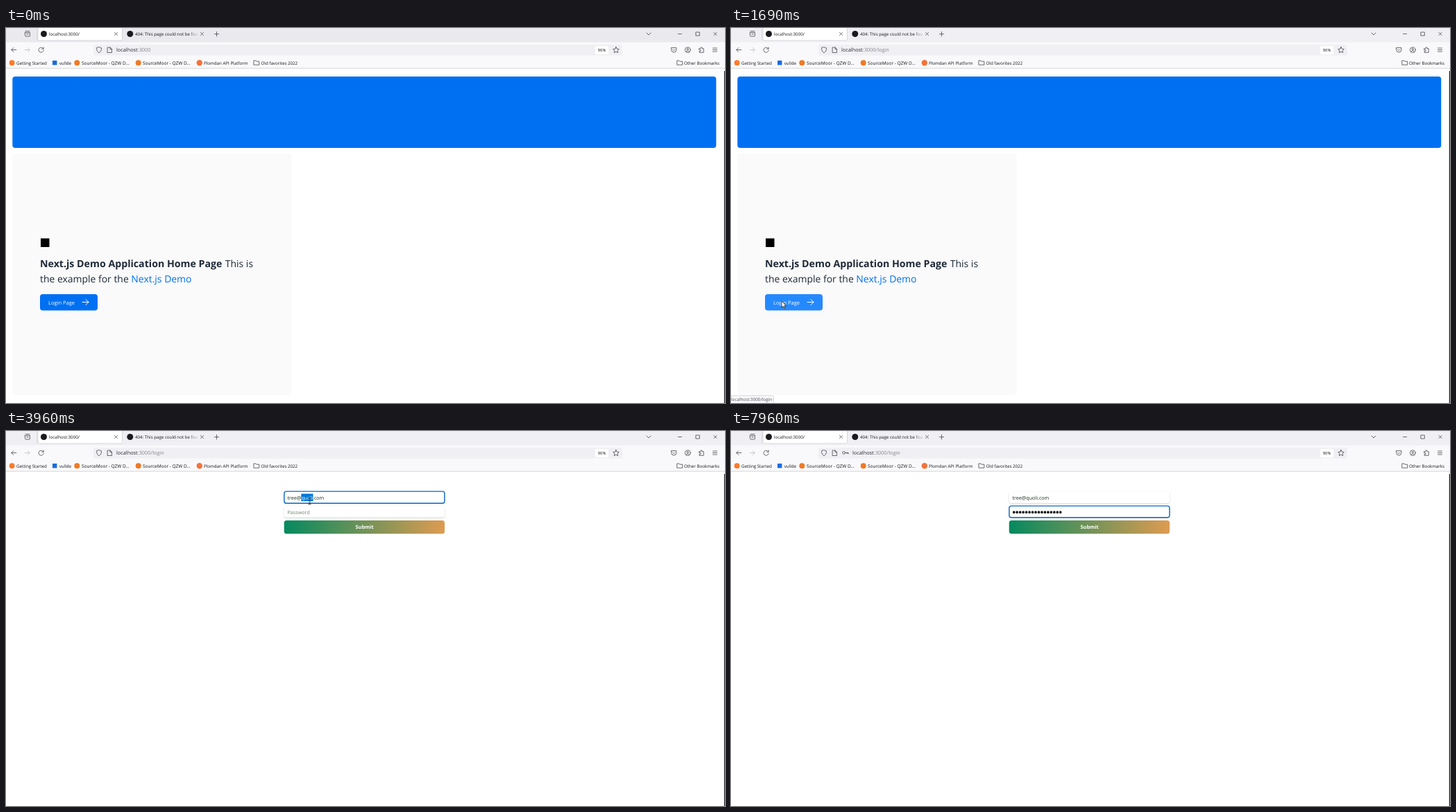
Animation of 1036x541 px, one loop 8 s. Source, as an HTML page:

```html
<!DOCTYPE html>
<html lang="en">
<head>
<meta charset="utf-8">
<title>Login demo</title>
<style>
  html, body { margin: 0; width: 100%; height: 100%; overflow: hidden; background: #fff; }
  svg { display: block; width: 100vw; height: 100vh; }
  text { font: 6.2px "Open Sans", "Noto Sans", sans-serif; text-rendering: geometricPrecision; white-space: pre; fill: #15141a; }
  .icon { fill: none; stroke: #45444d; stroke-width: .8; stroke-linecap: round; stroke-linejoin: round; }
  .url text { font-size: 7.34px; fill: #86858c; }
  .url .host { fill: #2b2a33; }
  .lead { font-size: 13.95px; fill: #1f2937; }
  .lead .strong { font-size: 14.2px; font-weight: 700; }
  .lead .link { fill: #0070f3; }
  .field { fill: #fff; filter: drop-shadow(0 1.6px 1.2px rgba(0, 0, 0, .17)); }
  .ring { fill: #fff; stroke: #0b66c3; stroke-width: 1.4; }
  .value { font-size: 7.16px; fill: #16301c; }
  .hint { font-size: 7.2px; fill: #73826f; }
  .caret { stroke: #111; stroke-width: .7; }

  /* One 8 s clock for every part; hard switches unless stated otherwise. */
  .strip, .home, .login, .status, .path, .shift, .key, .button, .arrow, .arrow-on, .beam, .beam-on,
  .ring-mail, .ring-pass, .pick, .caret-mail, .caret-pass, .caret-typed, .hint-pass, .cover {
    animation: 8s step-end infinite;
  }
  .strip { animation-name: wake; }
  .home { animation-name: home; }
  .login { animation-name: login; }
  .status { animation-name: status; }
  .path { animation-name: path; }
  .shift { animation-name: shift; }
  .key { animation-name: key; }
  .button { animation-name: hover; animation-timing-function: linear; }
  .arrow { animation-name: arrow; animation-timing-function: linear; }
  .arrow-on { animation-name: arrow-on; }
  .beam { animation-name: beam; animation-timing-function: linear; }
  .beam-on { animation-name: beam-on; }
  .ring-mail { animation-name: ring-mail; }
  .ring-pass { animation-name: ring-pass; }
  .pick { animation-name: pick; }
  .caret-mail { animation-name: caret-mail; }
  .caret-pass { animation-name: caret-pass; }
  .caret-typed { animation-name: caret-typed; }
  .hint-pass { animation-name: hint-pass; }
  .cover { animation-name: type; }

  @keyframes wake { 0% { fill: #eaeaee } 2.375%, 100% { fill: #f0f0f4 } }
  @keyframes home { 0% { opacity: 1 } 22%, 100% { opacity: 0 } }
  @keyframes login { 0% { opacity: 0 } 22%, 100% { opacity: 1 } }
  @keyframes status { 0% { opacity: 0 } 13.25% { opacity: 1 } 22% { opacity: .35 } 22.875%, 100% { opacity: 0 } }
  @keyframes path { 0% { opacity: 0 } 21.125%, 100% { opacity: 1 } }
  @keyframes shift { 0% { transform: none } 86.875%, 100% { transform: translateX(16px) } }
  @keyframes key { 0% { opacity: 0 } 86.875%, 100% { opacity: 1 } }
  @keyframes hover { 0%, 12.375% { fill: #0070f3 } 14.125%, 100% { fill: #2589fe } }
  @keyframes arrow {
    0%, 2.375% { transform: translate(1040px, 536px) }
    5.875%, 7.5% { transform: translate(617px, 467px) }
    9.125% { transform: translate(322px, 447px) }
    12.375% { transform: translate(112px, 400px) }
    15% { transform: translate(73px, 394px) }
    26.875% { transform: translate(73px, 394px); animation-timing-function: ease-in-out }
    36.125%, 100% { transform: translate(437px, 101px) }
  }
  @keyframes arrow-on { 0% { opacity: 1 } 35.25%, 100% { opacity: 0 } }
  @keyframes beam {
    0%, 58.625% { transform: translate(437.5px, 101px) }
    60.375%, 62.75% { transform: translate(432px, 111.5px) }
    64.5%, 100% { transform: translate(431px, 117.5px) }
  }
  @keyframes beam-on { 0% { opacity: 0 } 35.25% { opacity: 1 } 86.125%, 100% { opacity: 0 } }
  @keyframes ring-mail { 0% { opacity: 0 } 42.75% { opacity: 1 } 71.125%, 100% { opacity: 0 } }
  @keyframes ring-pass { 0% { opacity: 0 } 71.125%, 100% { opacity: 1 } }
  @keyframes pick { 0% { opacity: 0 } 48.625% { opacity: 1 } 71.125%, 100% { opacity: 0 } }
  @keyframes caret-mail { 0% { opacity: 0 } 42.75% { opacity: 1 } 48.625%, 100% { opacity: 0 } }
  @keyframes caret-pass { 0% { opacity: 0 } 71.125% { opacity: 1 } 79.5%, 100% { opacity: 0 } }
  @keyframes caret-typed { 0% { opacity: 0 } 86.125% { opacity: 1 } 92.75%, 100% { opacity: 0 } }
  @keyframes hint-pass { 0% { opacity: 1 } 86.125%, 100% { opacity: 0 } }
  @keyframes type {
    0% { transform: none }
    86.125% { transform: translateX(4.47px) }
    93.625% { transform: translateX(8.94px); animation-timing-function: steps(7, end) }
    99.5%, 100% { transform: translateX(71.52px) }
  }
</style>
</head>
<body>
<svg viewBox="0 0 1036 541" preserveAspectRatio="none">
  <defs>
    <linearGradient id="fade" gradientUnits="userSpaceOnUse" x1="262" x2="279">
      <stop stop-color="#15141a"/><stop offset="1" stop-color="#15141a" stop-opacity="0"/>
    </linearGradient>
    <linearGradient id="submit">
      <stop stop-color="#058a5f"/><stop offset="1" stop-color="#de9b51"/>
    </linearGradient>
    <clipPath id="inner"><rect x="402" y="110" width="229" height="13"/></clipPath>
    <path id="cross" d="M-2-2 2 2M2-2-2 2"/>
    <path id="folder" d="M0 .8h2.6l1 1.2h3.9v5H0z"/>
  </defs>

  <rect width="1036" height="541" fill="#fff"/>

  <!-- tab strip -->
  <rect class="strip" width="1036" height="21"/>
  <path d="M44.5 2V18" stroke="#cfcfd6" stroke-width=".7"/>
  <rect x="46" y="-4" width="121.5" height="22" rx="2.2" fill="#fff" stroke="#c9c9d1" stroke-width=".7"/>
  <circle cx="54.5" cy="8.5" r="4.5" fill="#1b1b1f"/>
  <circle cx="178.8" cy="8.5" r="4.5" fill="#1b1b1f"/>
  <text x="62" y="10.8">localhost:3000/</text>
  <text x="186" y="10.8" style="fill:url(#fade)">404: This page could not be fou</text>
  <g class="icon">
    <path d="M27.5 6.5h7v4.5q0 1-1 1h-5q-1 0-1-1zM28 4.6h6M29.7 8.8h2.6"/>
    <use href="#cross" x="158.5" y="8.5"/>
    <use href="#cross" x="282.5" y="8.5"/>
    <path d="M300.3 8.7h6.4M303.5 5.5v6.4M923 7l3 3 3-3M968.5 8.5h5M994.3 6h5v5h-5z"/>
    <use href="#cross" x="1022" y="8.5"/>
  </g>

  <!-- toolbar -->
  <rect y="20.5" width="1036" height="37.5" fill="#f9f9fb"/>
  <path d="M0 58.2H1036" stroke="#cccccf" stroke-width=".8"/>
  <rect x="126" y="24" width="762" height="15.6" rx="2.2" fill="#f0f0f4"/>
  <rect x="849" y="26" width="19" height="12" rx="2" fill="#fff"/>
  <text x="852.8" y="34" style="font-size:5.8px">90%</text>
  <g class="icon">
    <path d="M14.8 31.5H7.8M10.8 28.5l-3 3 3 3"/>
    <path d="M27.2 31.5h7M31.2 28.5l3 3-3 3" stroke="#bdbdc3"/>
    <path d="M53.6 29.6a3.6 3.6 0 1 0 .6 2.6M54.2 27.8v2.4h-2.4"/>
    <path d="M134 27.6l3.4 1.2q.4 4.8-3.4 7-3.8-2.2-3.4-7z"/>
    <path d="M146.5 28h3.8l2.2 2.2v5.3h-6zM150 28v2.5h2.5"/>
    <path d="M879 27.3l1.3 2.8 3 .4-2.2 2.1.6 3-2.7-1.5-2.7 1.5.6-3-2.2-2.1 3-.4z"/>
    <path d="M958.7 28.5h7.2v3a3.6 3.6 0 0 1-7.2 0zM960.6 31l1.7 1.6 1.7-1.6"/>
    <circle cx="982.3" cy="31.6" r="3.9"/>
    <path d="M980 33.9q2.3-2.4 4.6 0"/><circle cx="982.3" cy="30.6" r="1.2"/>
    <path d="M999 29.7h2v-1a1 1 0 0 1 2 0v1h2.2v5.6H999v-1.7h1.2a1 1 0 0 0 0-2H999z"/>
    <path d="M1018.5 29h6M1018.5 31.5h6M1018.5 34h6"/>
    <g class="key">
      <circle cx="162.6" cy="31.4" r="1.9"/><path d="M164.6 31.4h4.6v1.6M167.2 31.4v1.3"/>
    </g>
  </g>
  <g class="url shift">
    <text class="host" x="159" y="34.3">localhost<tspan fill="#86858c" style="fill:#86858c">:3000</tspan></text>
    <text class="path" x="208.5" y="34.3">/login</text>
  </g>

  <!-- bookmarks -->
  <circle cx="8.6" cy="50.2" r="3.9" fill="#ff7a2a"/>
  <rect x="67" y="47" width="6.4" height="6.4" fill="#1a6ce0"/>
  <circle cx="102.3" cy="50.2" r="4" fill="#ee7a26"/>
  <circle cx="190.7" cy="50.2" r="4" fill="#ee7a26"/>
  <circle cx="278.8" cy="50.2" r="4.2" fill="#f5733b"/>
  <g class="icon">
    <use href="#folder" x="357.3" y="46.2"/>
    <use href="#folder" x="967.2" y="46.2"/>
  </g>
  <text x="15" y="52.6">Getting Started</text>
  <text x="76.7" y="52.6">vullde</text>
  <text x="109" y="52.6" style="font-size:6.5px">SourceMoor - QZW D...</text>
  <text x="197" y="52.6" style="font-size:6.5px">SourceMoor - QZW D...</text>
  <text x="285" y="52.6">Plomdan API Platform</text>
  <text x="367.5" y="52.6">Old favorites 2022</text>
  <text x="977" y="52.6">Other Bookmarks</text>

  <!-- home page -->
  <g class="home">
    <rect x="9.3" y="70" width="1014" height="103" rx="4" fill="#0070f3"/>
    <rect x="9.3" y="181.5" width="402.2" height="348" rx="4" fill="#fafafa"/>
    <rect x="50" y="303.5" width="12.5" height="12.5"/>
    <text class="lead" x="49" y="344.8"><tspan class="strong">Next.js Demo Application Home Page</tspan></text>
    <text class="lead" x="315.8" y="344.8">This is</text>
    <text class="lead" x="49" y="366.8">the example for the <tspan class="link">Next.js Demo</tspan></text>
    <rect class="button" x="49" y="384" width="83" height="23.5" rx="4"/>
    <text x="61" y="398.6" style="font-size:7.5px;fill:#fff">Login Page</text>
    <path class="icon" d="M110 395.5h9M115 391.5l4 4-4 4" style="stroke:#fff;stroke-width:1"/>
  </g>

  <!-- login page -->
  <g class="login">
    <rect class="field" x="400.8" y="87.5" width="231" height="16.5" rx="3"/>
    <rect class="field" x="400.8" y="108.5" width="231" height="16" rx="3"/>
    <rect class="ring ring-mail" x="400.9" y="87.1" width="231" height="17.2" rx="3"/>
    <rect class="ring ring-pass" x="400.9" y="108.1" width="231" height="16.7" rx="3"/>
    <text class="value" x="405.5" y="98.7">tree@quoli.com</text>
    <g class="pick">
      <rect x="425.3" y="90.5" width="17.2" height="10.7" fill="#0078d7"/>
      <text class="value" x="425.4" y="98.7" style="fill:#fff">quoli</text>
    </g>
    <path class="caret caret-mail" d="M436.5 91v10"/>

    <path d="M407.7 117.2H475" stroke="#111" stroke-width="3.7" stroke-linecap="round" stroke-dasharray="0 4.47"/>
    <g clip-path="url(#inner)"><rect class="cover" x="405.4" y="113" width="74" height="9" fill="#fff"/></g>
    <text class="hint hint-pass" x="405.5" y="119.7">Password</text>
    <path class="caret caret-pass" d="M405.5 111.5v10.5"/>
    <path class="caret caret-typed" d="M410.4 111.5v10.5"/>

    <rect x="400.7" y="129" width="231.3" height="19.3" rx="3.5" fill="url(#submit)"/>
    <text x="516.6" y="141.2" text-anchor="middle" style="font-size:7.3px;font-weight:700;fill:#fff">Submit</text>
  </g>

  <!-- link preview -->
  <g class="status">
    <path d="M-1 530.4H59.5q2 0 2 2V542H-1z" fill="#f9f9fb" stroke="#c8c8cd" stroke-width=".7"/>
    <text x="0" y="538.2" style="font-size:6.3px;fill:#4a4a52">localhost:3000/login</text>
  </g>

  <!-- neighbouring window edge -->
  <path d="M1035.4 62V541" stroke="#25252b" stroke-width="1.2"/>

  <!-- pointers -->
  <g class="arrow-on">
    <path class="arrow" d="M0 0V9.2L2.1 7.3 3.6 10.6 5 10 3.6 6.8H6.4Z" fill="#fff" stroke="#222" stroke-width=".8"/>
  </g>
  <g class="beam-on">
    <path class="beam" d="M-2-4.6H-.6L0-4.2.6-4.6H2M0-4.2V4.2M-2 4.6H-.6L0 4.2.6 4.6H2" fill="none" stroke="#222" stroke-width=".9"/>
  </g>
</svg>
</body>
</html>
```
